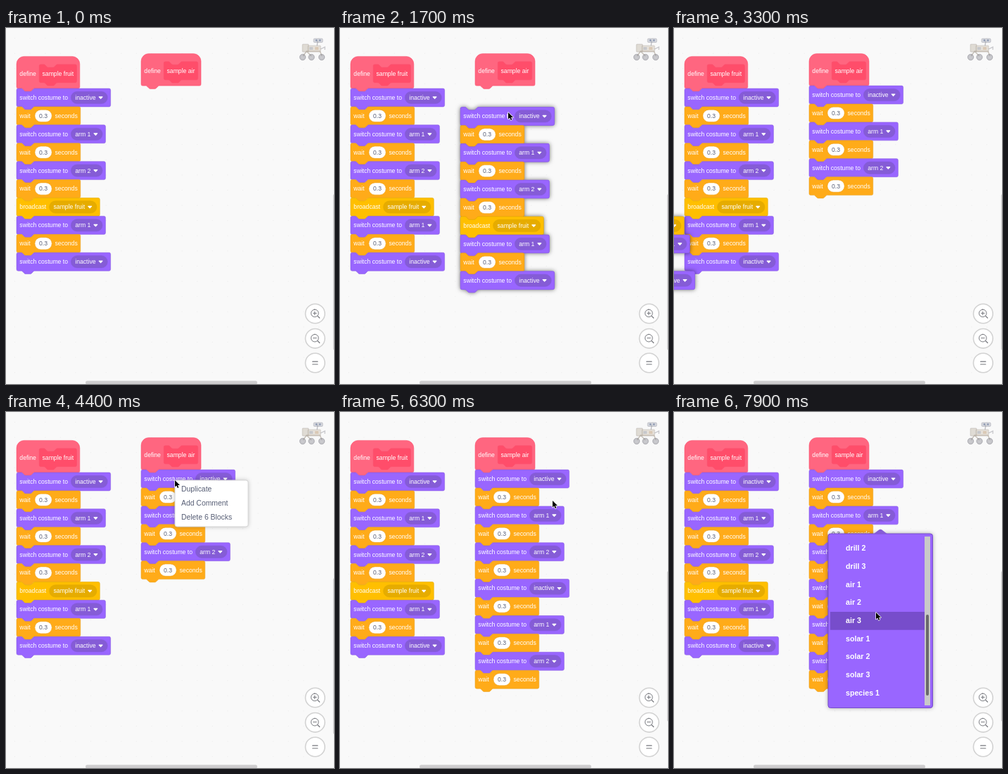
These frames come from a looping animation (466x506 px, 8 s). An HTML page with a canvas:

```html
<!DOCTYPE html>
<html lang="en">
<head>
<meta charset="utf-8">
<title>Block stacks</title>
<style>
html, body { margin: 0; width: 466px; height: 506px; overflow: hidden; background: #f9f9f9; }
canvas { display: block; width: 466px; height: 506px; }
</style>
</head>
<body>
<canvas id="stage"></canvas>
<script>
const W = 466, H = 506, LOOP = 8000, STEP = 100;
const SCALE = 0.54, ROW = 48 * SCALE;
const FACE = '"Liberation Sans", Arial, sans-serif';
const canvas = document.getElementById('stage');
const ctx = canvas.getContext('2d');
const dpr = window.devicePixelRatio || 1;
canvas.width = W * dpr;
canvas.height = H * dpr;

// fill, field, edge
const COLORS = {
  looks: ['#9966ff', '#855cd6', '#8459df'],
  control: ['#ffab19', '#ffffff', '#e89c18'],
  events: ['#ffbf00', '#e6ac00', '#e0a800'],
  define: ['#ff6680', '#ff4d6a', '#f9506e']
};
const BLOCKS = {
  i: { kind: 'looks', label: 'switch costume to', value: 'inactive' },
  1: { kind: 'looks', label: 'switch costume to', value: 'arm 1' },
  2: { kind: 'looks', label: 'switch costume to', value: 'arm 2' },
  b: { kind: 'events', label: 'broadcast', value: 'sample fruit' },
  w: { kind: 'control', label: 'wait', value: '0.3' }
};
const FULL = 'iw1w2wb1wi', HEAD = 'iw1w2w', TAIL = 'b1wi';
const LEFT = [15, 86], RIGHT = [192, 82.1];
const TAIL_Y = RIGHT[1] + 6 * ROW;
const COSTUMES = ['inactive', 'active', 'arm 1', 'arm 2', 'arm 3', 'soil 1', 'soil 2', 'soil 3',
  'drill 1', 'drill 2', 'drill 3', 'air 1', 'air 2', 'air 3', 'solar 1', 'solar 2', 'solar 3',
  'species 1', 'species 2'];

// time, x, y
const CURSOR = [
  [200, 440, 330], [700, 62, 97], [900, 66, 98], [1100, 90, 109], [1200, 92, 109],
  [1700, 239, 120], [1900, 260, 90], [2100, 256, 121], [2400, 256, 121],
  [2700, 205, 250], [2900, 205, 251], [3300, -91, 281], [3700, -60, 275],
  [4200, 238, 96], [4400, 240, 97], [4600, 262, 108], [4700, 262, 108],
  [5100, 241, 320], [5300, 243, 322], [5800, 257, 261], [5900, 257, 261],
  [6300, 302, 126], [6600, 304, 147], [6800, 304, 147], [7200, 298, 240],
  [7700, 290, 284], [7900, 287, 285]
];
const SCROLL = [[7200, 0], [7700, 231]];

const NOTCH = 'c2 0 3 1 4 2l4 4c1 1 2 2 4 2h12c2 0 3-1 4-2l4-4c1-1 2-2 4-2';
const NOTCH_BACK = 'c-2 0-3 1-4 2l-4 4c-1 1-2 2-4 2h-12c-2 0-3-1-4-2l-4-4c-1-1-2-2-4-2';
const bottom = (w, h) => `V${h - 4}a4 4 0 0 1-4 4H48${NOTCH_BACK}H4a4 4 0 0 1-4-4z`;
const blockPath = (w, h) => new Path2D(`M0 4a4 4 0 0 1 4-4H12${NOTCH}H${w - 4}a4 4 0 0 1 4 4${bottom(w, h)}`);
const hatPath = (w, h) => new Path2D(`M0 20a20 20 0 0 1 20-20H${w - 20}a20 20 0 0 1 20 20${bottom(w, h)}`);

function track(keys, t) {
  if (t <= keys[0][0]) return keys[0].slice(1);
  for (let k = 1; k < keys.length; k++) {
    const [a, b] = [keys[k - 1], keys[k]];
    if (t <= b[0]) {
      const p = (t - a[0]) / (b[0] - a[0]);
      return a.slice(1).map((v, n) => v + (b[n + 1] - v) * p);
    }
  }
  return keys[keys.length - 1].slice(1);
}

function text(str, x, y, color, font, align = 'left') {
  ctx.font = `${font} ${FACE}`;
  ctx.fillStyle = color;
  ctx.textAlign = align;
  ctx.textBaseline = 'middle';
  ctx.fillText(str, x, y);
}

function textWidth(str) {
  ctx.font = `16px ${FACE}`;
  return ctx.measureText(str).width;
}

function box(x, y, w, h, r, fill, stroke, line = 1) {
  ctx.beginPath();
  ctx.roundRect(x, y, w, h, r);
  if (fill) { ctx.fillStyle = fill; ctx.fill(); }
  if (stroke) { ctx.strokeStyle = stroke; ctx.lineWidth = line; ctx.stroke(); }
}

function disc(x, y, r, fill, stroke, line = 1) {
  box(x - r, y - r, 2 * r, 2 * r, r, fill, stroke, line);
}

function line(points, color, width) {
  ctx.beginPath();
  points.forEach(([x, y]) => ctx.lineTo(x, y));
  ctx.strokeStyle = color;
  ctx.lineWidth = width;
  ctx.stroke();
}

function inUnits(x, y, draw) {
  ctx.save();
  ctx.translate(x, y);
  ctx.scale(SCALE, SCALE);
  draw();
  ctx.restore();
}

function paint(path, fill, stroke) {
  ctx.fillStyle = fill;
  ctx.fill(path);
  ctx.strokeStyle = stroke;
  ctx.lineWidth = 1;
  ctx.stroke(path);
}

function layout(b) {
  if (b.kind === 'control') return { field: 48, end: 93, width: 168 };
  const field = 16 + textWidth(b.label);
  const arrow = field + 11 + textWidth(b.value) + 13;
  return { field, arrow, end: arrow + 18, width: arrow + 26 };
}

function drawBlock(b, x, y) {
  const [main, field, edge] = COLORS[b.kind];
  inUnits(x, y, () => {
    const l = layout(b);
    paint(blockPath(l.width, 48), main, edge);
    text(b.label, 8, 25, '#fff', '16px');
    box(l.field, 8, l.end - l.field, 32, 16, field, edge);
    if (!l.arrow) {
      text(b.value, (l.field + l.end) / 2, 25, '#575e75', '16px', 'center');
      text('seconds', 101, 25, '#fff', '16px');
      return;
    }
    text(b.value, l.field + 11, 25, '#fff', '16px');
    ctx.lineJoin = 'round';
    ctx.fillStyle = '#fff';
    const tri = new Path2D(`M${l.arrow - 4.5} 22h9l-4.5 4.8z`);
    ctx.fill(tri);
    ctx.strokeStyle = '#fff';
    ctx.lineWidth = 2;
    ctx.stroke(tri);
  });
}

function eachBlock(codes, [x, y], fn) {
  [...codes].forEach((c, n) => fn(BLOCKS[c], x, y + n * ROW));
}

function drawStack(codes, at) {
  eachBlock(codes, at, drawBlock);
}

function drawDragged(codes, at) {
  ctx.save();
  ctx.shadowColor = 'rgba(0,0,0,.6)';
  ctx.shadowBlur = 6 * dpr;
  eachBlock(codes, at, (b, x, y) => inUnits(x, y, () => {
    ctx.fillStyle = COLORS[b.kind][0];
    ctx.fill(blockPath(layout(b).width, 48));
  }));
  ctx.restore();
  drawStack(codes, at);
}

function drawMarker(code, x, y) {
  inUnits(x, y, () => {
    ctx.fillStyle = 'rgba(0,0,0,.2)';
    ctx.fill(blockPath(layout(BLOCKS[code]).width, 48));
  });
}

function hatWidth(name) {
  return textWidth('define') + textWidth(name) + 40;
}

function drawHat(name, [x, y]) {
  const [main, inner, edge] = COLORS.define;
  inUnits(x, y - 45.6, () => {
    const start = 16 + textWidth('define');
    paint(hatPath(hatWidth(name), 84.4), main, edge);
    text('define', 8, 46, '#fff', '16px');
    ctx.save();
    ctx.translate(start, 21);
    paint(blockPath(textWidth(name) + 16, 48), inner, edge);
    ctx.restore();
    text(name, start + 8, 46, '#fff', '16px');
  });
}

function drawGlow(name, codes, at) {
  const outline = path => {
    ctx.strokeStyle = '#fff200';
    ctx.lineWidth = 15.5;
    ctx.lineJoin = 'round';
    ctx.stroke(path);
  };
  ctx.save();
  ctx.shadowColor = '#fff200';
  ctx.shadowBlur = 2.5 * dpr;
  inUnits(at[0], at[1] - 45.6, () => outline(hatPath(hatWidth(name), 84.4)));
  eachBlock(codes, at, (b, x, y) => inUnits(x, y, () => outline(blockPath(layout(b).width, 48))));
  ctx.restore();
}

function drawRover(arm) {
  ctx.save();
  ctx.globalAlpha = 0.5;
  line([[422, 40], [427, 33], [446, 33], [449, 40]], '#988b7c', 1.5);
  line([[427, 33], [434, 40]], '#988b7c', 1.5);
  line([[442, 25], [443, 18]], '#8d8d96', 1.5);
  box(421, 23, 9, 11, 1, '#c6bdb0', '#9d9690', 0.7);
  box(429, 25, 18, 9, 1, '#d2c8ba', '#9d9690', 0.7);
  box(431, 27, 5, 4, 0.5, '#a9afbd');
  box(439, 27, 5, 4, 0.5, '#d0b294');
  box(437, 15, 13, 5.5, 1.5, '#b3b8c4', '#82828c', 0.7);
  disc(441, 17.7, 1.4, '#4b5f88');
  disc(446, 17.7, 1.4, '#4b5f88');
  line([[447, 30], [453, 27], [453, 31]], '#8d8d96', 1.2);
  if (arm) line([[422, 27], [418, arm === 1 ? 22 : 30], [417.5, arm === 1 ? 28 : 38]], '#82828c', 1.5);
  for (const x of [421.5, 434, 448.5]) {
    disc(x, 41.5, 4.2, '#93939b', '#6f6f78', 0.8);
    disc(x, 41.5, 1.7, '#d0d0d4');
  }
  ctx.restore();
}

function drawBackground() {
  ctx.fillStyle = '#f9f9f9';
  ctx.fillRect(0, 0, W, H);
  ctx.fillStyle = '#ebebeb';
  for (let x = 12; x < W; x += 21.6)
    for (let y = 14; y < H; y += 21.6) ctx.fillRect(x, y, 1, 1);
}

function drawControls(tall) {
  const ink = '#74767c';
  for (const y of [406, 441.3, 476]) disc(439.2, y, 13.8, '#fff', '#d2d2d2', 1.6);
  ctx.lineCap = 'round';
  for (const y of [406, 441.3]) {
    disc(438.7, y - 0.6, 5.3, null, ink, 1);
    line([[442.7, y + 3.4], [445.6, y + 6.2]], ink, 1.2);
    line([[436.3, y - 0.6], [441.1, y - 0.6]], ink, 1);
  }
  line([[438.7, 403], [438.7, 407.8]], ink, 1);
  line([[435.6, 474.2], [442.8, 474.2]], ink, 1.2);
  line([[435.6, 478], [442.8, 478]], ink, 1.2);
  ctx.lineCap = 'butt';
  box(113, 501.6, 244, 4.8, 2.4, '#cecdce');
  const [top, end] = tall ? [226, 440] : [236, 458];
  box(464.8, top, 4.8, end - top, 2.4, '#cecdce');
}

function drawContextMenu(x, y, count, hover) {
  ctx.save();
  ctx.shadowColor = 'rgba(0,0,0,.25)';
  ctx.shadowBlur = 6 * dpr;
  box(x, y, 104, 66, 3, '#fff');
  ctx.restore();
  box(x, y, 104, 66, 3, null, '#d5d5d5');
  if (hover) box(x + 1, y + 3, 102, 20, 0, '#e5e9f5');
  ['Duplicate', 'Add Comment', `Delete ${count} Blocks`].forEach((s, n) =>
    text(s, x + 9, y + 13.5 + n * 20, '#575e75', '10.4px'));
}

function drawDropdown(scroll, [cx, cy]) {
  const pitch = 25.7;
  ctx.save();
  ctx.shadowColor = 'rgba(0,0,0,.35)';
  ctx.shadowBlur = 6 * dpr;
  box(219, 173, 148.5, 247.5, 3.5, '#9966ff');
  ctx.restore();
  box(219, 173, 148.5, 247.5, 3.5, '#9966ff', '#774dcb');
  ctx.fillStyle = '#855cd6';
  ctx.fill(new Path2D('M284 173l7.5-5.7q1.8-1.2 3.6 0l7.5 5.7z'));
  ctx.save();
  ctx.beginPath();
  ctx.rect(222, 177, 142, 240);
  ctx.clip();
  COSTUMES.forEach((name, n) => {
    const y = 181 + n * pitch - scroll;
    if (cx > 222 && cx < 356 && cy >= y && cy < y + pitch) box(222, y, 134, pitch, 0, '#774dcb');
    if (name === 'arm 1') line([[229, y + 13], [232, y + 16], [238, y + 9]], '#fff', 1.6);
    text(name, 244, y + 13, '#fff', 'bold 10.67px');
  });
  ctx.restore();
  box(356, 177, 8, 240, 0, '#c9c9c9');
  box(358, 177 + scroll * 0.48, 4, 115, 2, '#696969');
}

function drawCursor(x, y, hand) {
  ctx.save();
  ctx.translate(x, y);
  ctx.lineJoin = 'round';
  const shape = new Path2D(hand
    ? 'M-3 4.5L-5 1q-.3-1.5 1.2-1L-2.6 1-3.4-2.6q.6-1.4 1.6 0L-1.2-.6-1-3.6q.9-1.3 1.8 0L1-.6 1.8-3q1.1-1 1.6.3L3-.2 4-1.4q1.2-.4 1.2.8L4 3 3 5z'
    : 'M0 0V9.6L2.2 7.6 3.8 11 5.4 10.2 3.9 7H7z');
  ctx.lineWidth = hand ? 2 : 1.4;
  ctx.strokeStyle = hand ? '#000' : '#fff';
  ctx.fillStyle = hand ? '#fff' : '#000';
  ctx.stroke(shape);
  ctx.fill(shape);
  if (hand) for (const fx of [-1.4, 0.6, 2.4]) line([[fx, -0.8], [fx, 1.6]], '#000', 0.7);
  ctx.restore();
}

function draw(t) {
  const during = (a, b) => t >= a && t < b;
  const [cx, cy] = track(CURSOR, t);
  ctx.setTransform(dpr, 0, 0, dpr, 0, 0);
  drawBackground();
  drawRover(during(2400, 2600) || during(2800, 3000) ? 1 : during(2600, 2800) ? 2 : 0);

  drawHat('sample fruit', LEFT);
  drawStack(FULL, LEFT);

  const codes = t < 1900 ? '' : t < 2900 ? FULL : t < 5800 ? HEAD : HEAD + HEAD;
  if (during(2100, 2800)) drawGlow('sample air', codes, RIGHT);
  drawHat('sample air', RIGHT);
  if (during(1800, 1900)) drawMarker('i', ...RIGHT);
  drawStack(codes, RIGHT);
  if (during(5700, 5800)) drawMarker('i', RIGHT[0], TAIL_Y);

  drawControls(t >= 5800);

  if (during(1200, 1900)) drawDragged(FULL, [cx - 68, cy - 7.5]);
  if (during(2900, 3600)) drawDragged(TAIL, [cx - 13, cy - 13]);
  if (during(4700, 5800)) drawDragged(HEAD, [cx - 65.5, cy - 23]);

  if (during(800, 1200)) drawContextMenu(64, 98, 10, t >= 1000);
  if (during(4400, 4700)) drawContextMenu(240, 97, 6, t >= 4500);
  if (t >= 6800) drawDropdown(track(SCROLL, t)[0], [cx, cy]);

  const hand = during(700, 800) || during(2000, 3300) || during(4200, 4400);
  if (t >= 200) drawCursor(cx, cy, hand);
}

const start = performance.now();
function frame() {
  const t = (performance.now() - start) % LOOP;
  draw(Math.floor(t / STEP) * STEP);
  requestAnimationFrame(frame);
}
frame();
</script>
</body>
</html>
```
